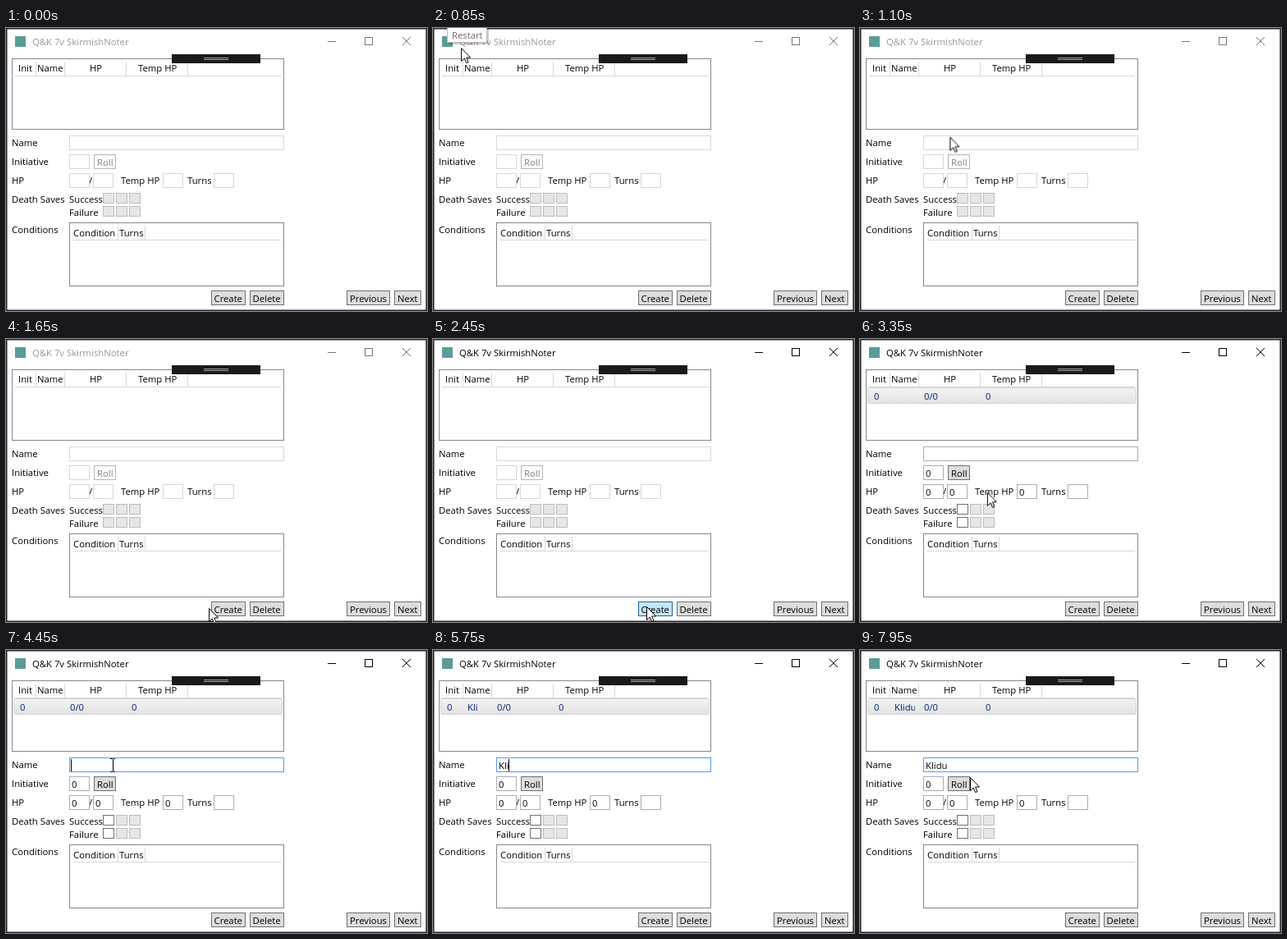
These frames come from a looping animation (513 by 345 pixels, 8 s). An HTML page:

```html
<!DOCTYPE html>
<html lang="en">
<head>
<meta charset="utf-8">
<title>Combat list</title>
<style>
html, body { margin: 0; width: 100%; height: 100%; overflow: hidden; background: #fff; }
svg.stage { display: block; width: 513px; height: 345px; }
text { font: 11.3px "Open Sans", "Noto Sans", sans-serif; fill: #000; white-space: pre; }
rect, .rule, .sep { shape-rendering: crispEdges; }
.rule, .sep { fill: none; stroke: #d8d8d8; }
.list { fill: #fff; stroke: #828790; }
.btn { fill: #ddd; stroke: #707070; }
.box { fill: #fff; stroke: #abadb3; }
.dim .box { stroke: #d6d7d9; }
.dim .btn { fill: #fdfdfd; stroke: #b4b6b8; }
.dim text { fill: #838383; }
.check { fill: #e6e6e6; stroke: #bcbcbc; }
.check.live { fill: #fff; stroke: #707070; }
.row text { fill: #042271; }

/* Hard state changes, all on one 8 s clock */
.live-ui, .dim, .title, .title text, .create, .name, .caret, .caret-x,
.arrow, .beam, tspan { animation: 8s step-end infinite; }
.live-ui { animation-name: appear; }
.dim { animation-name: vanish; }
.title { animation-name: activate; }
.title text { fill: inherit; animation: none; }
.create { animation-name: press; }
.name { animation-name: focus; }
.caret { fill: #000; animation-name: blink; }
.caret-x { animation-name: advance; }
.arrow { animation-name: arrow; }
.beam { animation-name: beam; }
.k1 { animation-name: k1; }
.k2 { animation-name: k2; }
.k3 { animation-name: k3; }
.k4 { animation-name: k4; }
.k5 { animation-name: k5; }

@keyframes appear { 0% { visibility: hidden } 32.5%, to { visibility: visible } }
@keyframes vanish { 0% { visibility: visible } 32.5%, to { visibility: hidden } }
@keyframes activate { 0% { fill: #999; stroke: #777 } 30.625%, to { fill: #000; stroke: #000 } }
@keyframes press {
  0%, 37.5%, to { fill: #ddd; stroke: #707070 }
  21.875%, 32.5% { fill: #bee6fd; stroke: #3c7fb1 }
  30.625% { fill: #c4e5f6; stroke: #2c628b }
}
@keyframes focus {
  0% { stroke: #d6d7d9 }
  32.5% { stroke: #abadb3 }
  44.375% { stroke: #7eb4ea }
  51.25%, to { stroke: #569de5 }
}
@keyframes blink {
  0%, 57.5%, 85%, 96.25%, to { visibility: hidden }
  51.25%, 63.125%, 90.625% { visibility: visible }
}
@keyframes advance {
  0% { transform: none }
  65.625% { transform: translateX(7px) }
  68.75% { transform: translateX(10px) }
  71.875% { transform: translateX(13px) }
  76.875% { transform: translateX(20px) }
  78.125%, to { transform: translateX(27px) }
}
@keyframes k1 { 0% { visibility: hidden } 65.625%, to { visibility: visible } }
@keyframes k2 { 0% { visibility: hidden } 68.75%, to { visibility: visible } }
@keyframes k3 { 0% { visibility: hidden } 71.875%, to { visibility: visible } }
@keyframes k4 { 0% { visibility: hidden } 76.875%, to { visibility: visible } }
@keyframes k5 { 0% { visibility: hidden } 78.125%, to { visibility: visible } }
@keyframes arrow {
  0%, 44.375% { visibility: hidden }
  9.375%, 97.5%, to { visibility: visible }
}
@keyframes beam {
  0%, 65.625%, 97.5%, to { visibility: hidden }
  44.375%, 96.25% { visibility: visible }
}

/* Smooth motion */
.tip { animation: tip 8s linear infinite; }
@keyframes tip {
  0%, 0.625% { opacity: 0 }
  3.125%, 10.625% { opacity: 1 }
  11.875%, to { opacity: 0 }
}
.pointer { animation: move 8s linear infinite; }
@keyframes move {
  0%, 9.375% { transform: translate(32px, -4px) }
  10.625% { transform: translate(34px, 24px); animation-timing-function: cubic-bezier(.4, .1, .5, 1) }
  19.375% { transform: translate(245px, 328px) }
  20.625% { transform: translate(247px, 328px) }
  24.375%, 36.25% { transform: translate(260px, 326px); animation-timing-function: cubic-bezier(.4, 0, .8, .8) }
  41.875% { transform: translate(155px, 187px); animation-timing-function: cubic-bezier(.2, .4, .6, 1) }
  46.25%, 95.625% { transform: translate(130px, 140px) }
  97.5% { transform: translate(136px, 149px) }
  99.375%, to { transform: translate(134px, 155px) }
}
</style>
</head>
<body>
<svg class="stage" viewBox="0 0 513 345">
  <rect width="513" height="345" fill="#262626"/>
  <rect x="1.5" y="1.5" width="510" height="342" fill="#fff" style="shape-rendering:auto"/>

  <!-- Title bar -->
  <rect x="11" y="10" width="13" height="13" fill="#5b9c98"/>
  <g class="title">
    <text x="32" y="21" stroke="none">Q&amp;K 7v SkirmishNoter</text>
    <path d="M392 16.5h10M437.5 11.5h9v9h-9z" fill="none" shape-rendering="crispEdges"/>
    <path d="M483 11l10 10M493 11l-10 10" fill="none"/>
  </g>

  <!-- Combatant list -->
  <rect class="list" x="7.5" y="37.5" width="331" height="86" rx="1"/>
  <path class="sep" d="M36.5 41v17M71.5 41v17M146.5 41v17M221.5 41v17"/>
  <path class="rule" d="M11 58.5h324"/>
  <text x="15" y="53">Init</text>
  <text x="38" y="53">Name</text>
  <text x="102" y="53">HP</text>
  <text x="161" y="53">Temp HP</text>
  <linearGradient id="sel" x2="0" y2="1">
    <stop stop-color="#f3f3f3"/><stop offset="1" stop-color="#e2e2e2"/>
  </linearGradient>
  <g class="row live-ui">
    <rect x="9.5" y="59.5" width="327" height="19" rx="2" fill="url(#sel)" stroke="#d4d4d4" style="shape-rendering:auto"/>
    <text x="17" y="74">0</text>
    <text x="78" y="74">0/0</text>
    <text x="153" y="74">0</text>
  </g>
  <svg class="row" x="42" y="60" width="25" height="18">
    <text y="14"><tspan class="k1">K</tspan><tspan class="k2">l</tspan><tspan class="k3">i</tspan><tspan class="k4">d</tspan><tspan class="k5">u</tspan></text>
  </svg>

  <!-- Debug bar -->
  <rect x="202" y="32" width="108" height="11" fill="#1a1a1a"/>
  <path d="M241 36.5h30M241 38.5h30" stroke="#a0a0a0" shape-rendering="crispEdges"/>

  <!-- Form labels -->
  <text x="7" y="144">Name</text>
  <text x="7" y="167">Initiative</text>
  <text x="7" y="190">HP</text>
  <text x="101" y="190">/</text>
  <text x="140" y="190">Temp HP</text>
  <text x="221" y="190">Turns</text>
  <text x="7" y="213">Death Saves</text>
  <text x="77" y="213">Success</text>
  <text x="77" y="229">Failure</text>
  <text x="7" y="250">Conditions</text>

  <!-- Fields -->
  <rect class="box name" x="77.5" y="131.5" width="261" height="17"/>
  <g class="dim">
    <rect class="box" x="77.5" y="154.5" width="24" height="17"/>
    <rect class="box" x="77.5" y="177.5" width="24" height="17"/>
    <rect class="box" x="106.5" y="177.5" width="24" height="17"/>
    <rect class="box" x="191.5" y="177.5" width="24" height="17"/>
    <rect class="box" x="253.5" y="177.5" width="24" height="17"/>
    <rect class="btn" x="107.5" y="154.5" width="26" height="17"/>
    <text x="111" y="168">Roll</text>
  </g>
  <g class="live-ui">
    <rect class="box" x="77.5" y="154.5" width="24" height="17"/>
    <rect class="box" x="77.5" y="177.5" width="24" height="17"/>
    <rect class="box" x="106.5" y="177.5" width="24" height="17"/>
    <rect class="box" x="191.5" y="177.5" width="24" height="17"/>
    <rect class="box" x="253.5" y="177.5" width="24" height="17"/>
    <rect class="btn" x="107.5" y="154.5" width="26" height="17"/>
    <text x="111" y="168">Roll</text>
    <text x="80" y="168">0</text>
    <text x="80" y="191">0</text>
    <text x="109" y="191">0</text>
    <text x="194" y="191">0</text>
  </g>
  <text x="80" y="145"><tspan class="k1">K</tspan><tspan class="k2">l</tspan><tspan class="k3">i</tspan><tspan class="k4">d</tspan><tspan class="k5">u</tspan></text>
  <g class="caret-x"><rect class="caret" x="79" y="133" width="1" height="15"/></g>

  <!-- Death saves -->
  <rect class="check" x="118.5" y="201.5" width="13" height="12"/>
  <rect class="check" x="134.5" y="201.5" width="13" height="12"/>
  <rect class="check" x="150.5" y="201.5" width="13" height="12"/>
  <rect class="check" x="118.5" y="217.5" width="13" height="12"/>
  <rect class="check" x="134.5" y="217.5" width="13" height="12"/>
  <rect class="check" x="150.5" y="217.5" width="13" height="12"/>
  <g class="live-ui">
    <rect class="check live" x="118.5" y="201.5" width="13" height="12"/>
    <rect class="check live" x="118.5" y="217.5" width="13" height="12"/>
  </g>

  <!-- Condition list -->
  <rect class="list" x="77.5" y="237.5" width="261" height="77" rx="1"/>
  <path class="sep" d="M136.5 241v17M169.5 241v17"/>
  <path class="rule" d="M82 258.5h253"/>
  <text x="82" y="254">Condition</text>
  <text x="138" y="254">Turns</text>

  <!-- Buttons -->
  <rect class="btn create" x="250.5" y="320.5" width="41" height="17"/>
  <rect class="btn" x="297.5" y="320.5" width="41" height="17"/>
  <rect class="btn" x="415.5" y="320.5" width="52" height="17"/>
  <rect class="btn" x="473.5" y="320.5" width="32" height="17"/>
  <text x="253.5" y="334">Create</text>
  <text x="300.5" y="334">Delete</text>
  <text x="419" y="334">Previous</text>
  <text x="477" y="334">Next</text>

  <!-- Tooltip and pointer -->
  <g class="tip">
    <rect x="19" y="0" width="49" height="20" fill="#000" opacity=".2"/>
    <rect x="17.5" y="-1.5" width="48" height="19" fill="#fff" stroke="#b8b8b8"/>
    <text x="23" y="13" style="fill:#75656a">Restart</text>
  </g>
  <g class="pointer">
    <path class="arrow" d="M.5 .5V16.5L4.2 13 6.7 18.6 9 17.6 6.6 12H11.5Z" fill="#fff" stroke="#000"/>
    <path class="beam" d="M-3 -7.5h2.5M.5 -7.5h2.5M0 -7v15M-3 8.5h2.5M.5 8.5h2.5" fill="none" stroke="#000" shape-rendering="crispEdges"/>
  </g>
</svg>
</body>
</html>
```
